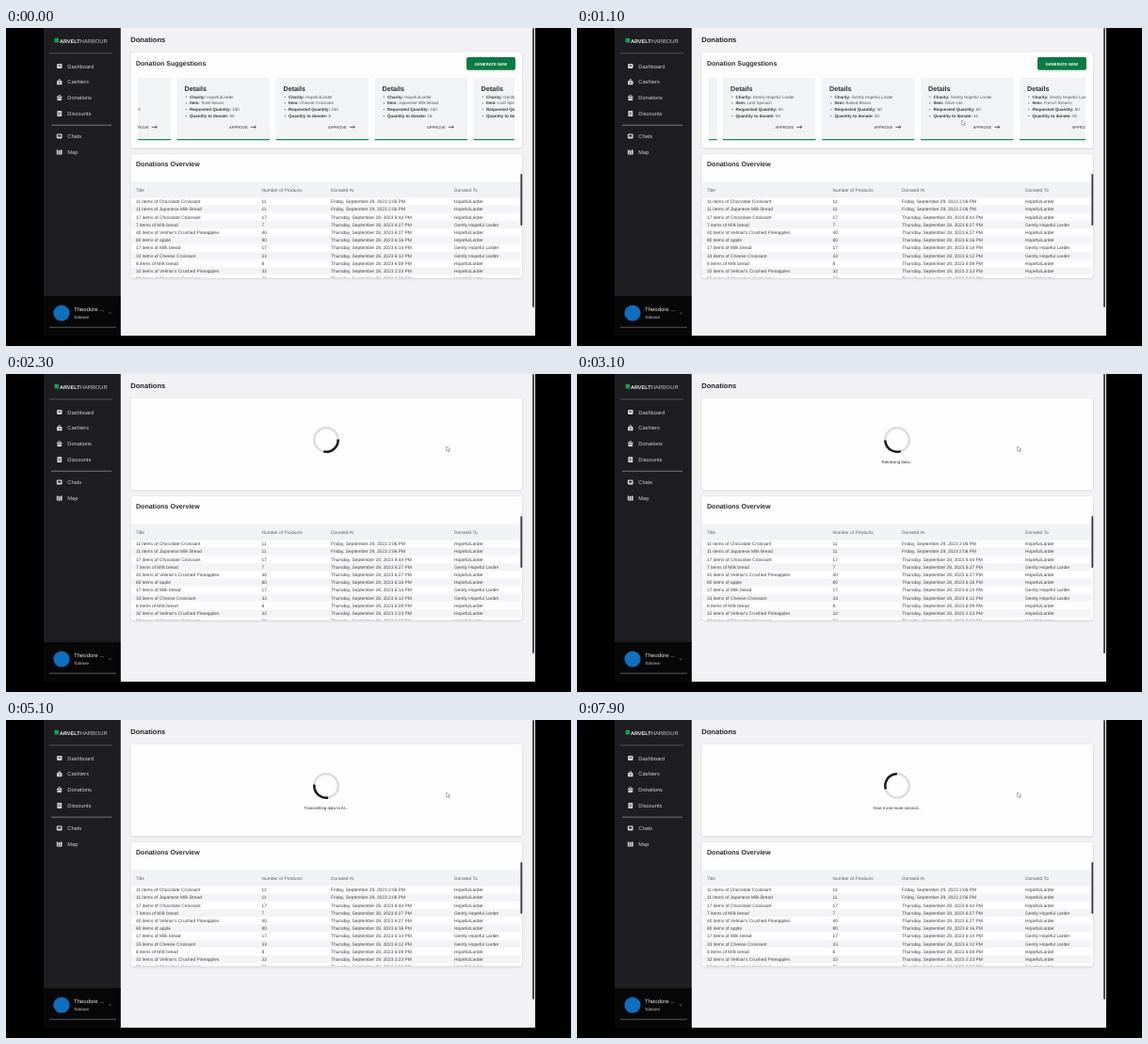
These frames come from a looping animation (600 px wide and 338 px high, 8000 ms). An HTML page with a canvas:

```html
<!DOCTYPE html>
<html lang="en">
<head>
<meta charset="utf-8">
<title>Donations</title>
<style>
html, body { margin: 0; width: 100%; height: 100%; overflow: hidden; background: #000; }
canvas { display: block; width: 600px; height: 338px; }
</style>
</head>
<body>
<canvas id="stage"></canvas>
<script>
const LOOP = 8000, STEP = 100, LOAD_AT = 1400;
const canvas = document.getElementById('stage');
const ctx = canvas.getContext('2d');
const ratio = window.devicePixelRatio || 1;
canvas.width = 600 * ratio;
canvas.height = 338 * ratio;
ctx.scale(ratio, ratio);

const CHARITY = 'HopefulLarder', CHARITY_2 = 'Gently Hopeful Larder';
const GREEN = '#0a7a43', INK = '#2c2c31';

// charity, item, requested, to donate
const cards = [
  [CHARITY, 'Milk Bread', 150, 20],
  [CHARITY, 'Tovel Beans', 150, 50],
  [CHARITY, 'Cheese Croissant', 150, 8],
  [CHARITY, 'Japanese Milk Bread', 150, 16],
  [CHARITY_2, 'Leaf Spinach', 50, 50],
  [CHARITY_2, 'Baked Beans', 50, 50],
  [CHARITY_2, 'Drive can', 50, 41],
  [CHARITY_2, 'French Bread L', 50, 50]
];

const FRI = 'Friday, September 29', THU = 'Thursday, September 28';
// count, product, day, time, charity
const rows = [
  [11, 'Chocolate Croissant', FRI, '2:06', CHARITY],
  [11, 'Japanese Milk Bread', FRI, '2:06', CHARITY],
  [17, 'Chocolate Croissant', THU, '8:44', CHARITY],
  [7, 'Milk bread', THU, '6:27', CHARITY_2],
  [40, "Velmar's Crushed Pineapples", THU, '6:27', CHARITY],
  [80, 'apple', THU, '6:16', CHARITY],
  [17, 'Milk bread', THU, '6:14', CHARITY_2],
  [33, 'Cheese Croissant', THU, '6:12', CHARITY_2],
  [8, 'Milk bread', THU, '6:09', CHARITY],
  [32, "Velmar's Crushed Pineapples", THU, '2:23', CHARITY],
  [50, 'Chocolate Croissant', THU, '2:23', CHARITY]
];
const columns = [138, 271.5, 345, 476];

const messages = [
  [7100, 'Give it one more second...'],
  [5700, 'The AI is thinking...'],
  [4300, 'Transmitting data to AI...'],
  [2900, 'Retrieving data...']
];

// time, x, y of the pointer tip
const pointerPath = [[500, 409, 98], [1100, 409, 98], [1400, 498, 40], [1500, 498, 40], [1800, 468, 77], [LOOP, 468, 77]];

const ease = p => p * p * (3 - 2 * p);
const clamp = p => Math.max(0, Math.min(1, p));

function rect(x, y, w, h, color, radius = 0) {
  ctx.fillStyle = color;
  ctx.beginPath();
  ctx.roundRect(x, y, w, h, radius);
  ctx.fill();
}

function path(points, color, closed) {
  ctx.beginPath();
  points.forEach(([x, y]) => ctx.lineTo(x, y));
  if (closed) ctx.closePath();
  ctx.strokeStyle = color;
  ctx.stroke();
}

// Returns the x where the text ends.
function text(str, x, y, size, color, bold = false, align = 'left') {
  ctx.font = `${bold ? 'bold ' : ''}${size}px "Liberation Sans", Arial, sans-serif`;
  ctx.textRendering = 'geometricPrecision';
  ctx.textAlign = align;
  ctx.fillStyle = color;
  ctx.fillText(str, x, y);
  return x + ctx.measureText(str).width;
}

function panel(y, h) {
  ctx.save();
  ctx.shadowColor = 'rgba(0,0,0,.16)';
  ctx.shadowBlur = 2.5 * ratio;
  ctx.shadowOffsetY = 0.6 * ratio;
  rect(132.5, y, 415.5, h, '#fdfdfe', 3);
  ctx.restore();
}

function clipTo(x, y, w, h, draw) {
  ctx.save();
  ctx.beginPath();
  ctx.rect(x, y, w, h);
  ctx.clip();
  draw();
  ctx.restore();
}

const icons = [
  y => { rect(54, y - 2.5, 5.5, 5, '#d5d5d8', 1.3); rect(55.6, y - 1, 2.4, 1, '#222'); },
  y => { rect(54, y - 1.2, 5.5, 4.2, '#d5d5d8', .6); rect(55.5, y - 3, 2.5, 1.4, '#aaa', .5); rect(56, y + .3, 1.6, 1, '#222'); },
  y => { rect(54, y - 1.4, 5.5, 1.7, '#d5d5d8'); rect(54.4, y + .7, 4.7, 2.3, '#d5d5d8'); rect(55.2, y - 2.9, 3.1, 1.1, '#bbb', .5); },
  y => { rect(54.4, y - 2.8, 4.8, 5.8, '#d5d5d8', .5); rect(55.8, y - 1.2, 2, .7, '#222'); rect(55.8, y + .6, 2, .7, '#222'); },
  y => { rect(53.8, y - 2.4, 5.8, 5, '#d5d5d8', 1); rect(55, y - 1.3, 3.4, 1.8, '#222'); },
  y => { rect(53.8, y - 2.3, 1.6, 5, '#d5d5d8'); rect(55.9, y - 1.9, 1.6, 5, '#d5d5d8'); rect(58, y - 2.3, 1.6, 5, '#d5d5d8'); }
];

function sidebar() {
  rect(40, 0, 81.5, 327, '#1e1d21');
  rect(40, 285, 81.5, 42, '#070708');
  rect(51.5, 10.8, 4.6, 4.6, '#12a05a');
  const end = text('ARVELT', 57, 15.5, 5.5, '#f2f2f2', true);
  text('HARBOUR', end + .2, 15.5, 5.8, '#c4c4c6');
  rect(46, 26.6, 67, .7, '#626266');
  ['Dashboard', 'Cashiers', 'Donations', 'Discounts', 'Chats', 'Map'].forEach((label, i) => {
    const y = i < 4 ? 40.5 + i * 16.8 : 115 + (i - 4) * 16.8;
    icons[i](y);
    text(label, 65.3, y + 2.1, 5.7, '#d2d2d4');
  });
  rect(48, 102.8, 64, .9, '#77777b');
  rect(50.4, 294.4, 17.2, 17.2, '#0d6fbd', 8.6);
  text('Theodore ...', 72, 301.2, 6, '#e4e4e6');
  text('Tolmere', 72, 308.6, 4.5, '#d0d0d2');
  ctx.lineWidth = .6;
  path([[108.8, 302.4], [110.2, 303.6], [111.6, 302.4]], '#999');
  rect(46, 317.8, 71, .8, '#77777b');
}

function card(x, [charity, item, requested, donate]) {
  rect(x, 53, 98.5, 66, '#f2f3f5', 1);
  rect(x, 118, 98.5, 1.3, '#1b8752');
  text('Details', x + 8, 67.4, 7.2, INK, true);
  [['Charity:', charity], ['Item:', item], ['Requested Quantity:', requested], ['Quantity to donate:', donate]]
    .forEach(([label, value], i) => {
      const y = 74.6 + i * 6.75;
      rect(x + 9.2, y - 2.1, 1.2, 1.2, '#444', .6);
      const end = text(label, x + 13.5, y, 4.5, '#38383d', true);
      text(' ' + value, end, y, 4.5, '#55555a');
    });
  text('APPROVE', x + 55.5, 106.6, 4.1, INK);
  ctx.lineWidth = .7;
  path([[x + 78.3, 105.3], [x + 83.8, 105.3]], '#222');
  path([[x + 82.2, 103.9], [x + 83.8, 105.3], [x + 82.2, 106.7]], '#222');
}

function suggestions(t) {
  panel(25.5, 102);
  text('Donation Suggestions', 138, 40, 7, INK, true);
  rect(489, 31, 52, 13.8, GREEN, 2);
  text('GENERATE NEW', 514.8, 39.5, 4.25, '#fff', true, 'center');
  const scroll = 341.5 * ease(clamp(t / 1000));
  clipTo(140, 52, 400, 68, () => cards.forEach((c, i) => card(76.5 + 105 * i - scroll, c)));
}

function loading(t) {
  panel(25.5, 98);
  const mid = (1.444 * t + 59 - 90) * Math.PI / 180, half = .92;
  ctx.lineWidth = 2.5;
  [['#dcdce0', 0, 2 * Math.PI], ['#1b1a1f', mid - half, mid + half]].forEach(([color, from, to]) => {
    ctx.strokeStyle = color;
    ctx.beginPath();
    ctx.arc(340, 70, 12.7, from, to);
    ctx.stroke();
  });
  const message = messages.find(([start]) => t >= start);
  if (message) text(message[1], 340, 95.4, 4.37, '#2a2a2e', false, 'center');
}

function overview() {
  panel(134, 131.8);
  text('Donations Overview', 138, 147, 7.05, INK, true);
  rect(132.5, 163.5, 414, 17, '#f1f2f5');
  ['Title', 'Number of Products', 'Donated At', 'Donated To']
    .forEach((label, i) => text(label, columns[i], 173.8, 4.85, '#606065'));
  clipTo(132.5, 180.5, 414, 85, () => rows.forEach(([count, product, day, time, charity], i) => {
    const y = 184.5 + i * 8.2;
    if (i % 2) rect(132.5, y - 4.1, 414, 8.2, '#f4f4f7');
    [`${count} items of ${product}`, count, `${day}, 2023 ${time} PM`, charity]
      .forEach((cell, c) => text(cell, columns[c], y + 1.7, 4.85, '#424247'));
  }));
  rect(546.4, 155, 1.8, 55, '#3a3a3e', .9);
}

function pointer(t) {
  const i = pointerPath.findIndex(([time]) => time > t);
  if (i < 1) return;
  const [t0, x0, y0] = pointerPath[i - 1], [t1, x1, y1] = pointerPath[i];
  const p = ease((t - t0) / (t1 - t0));
  ctx.save();
  ctx.translate(x0 + (x1 - x0) * p, y0 + (y1 - y0) * p);
  ctx.lineWidth = .7;
  ctx.fillStyle = '#fff';
  path([[0, 0], [0, 4.8], [1.1, 3.9], [1.9, 5.6], [2.7, 5.2], [2, 3.6], [3.4, 3.4]], '#333', true);
  ctx.fill();
  ctx.restore();
}

function draw(t) {
  rect(0, 0, 600, 338, '#000');
  rect(121.5, 0, 440.5, 327, '#f2f1f4');
  sidebar();
  rect(559, 0, 2, 297, '#4a4a4e', 1);
  text('Donations', 132.3, 15.4, 7.55, '#222226', true);
  const busy = t >= LOAD_AT;
  busy ? loading(t) : suggestions(t);
  ctx.save();
  ctx.translate(0, busy ? -4 : 0);
  overview();
  ctx.restore();
  pointer(t);
}

const start = performance.now();
function tick() {
  const t = (performance.now() - start) % LOOP;
  draw(Math.floor(t / STEP) * STEP);
  requestAnimationFrame(tick);
}
tick();
</script>
</body>
</html>
```
